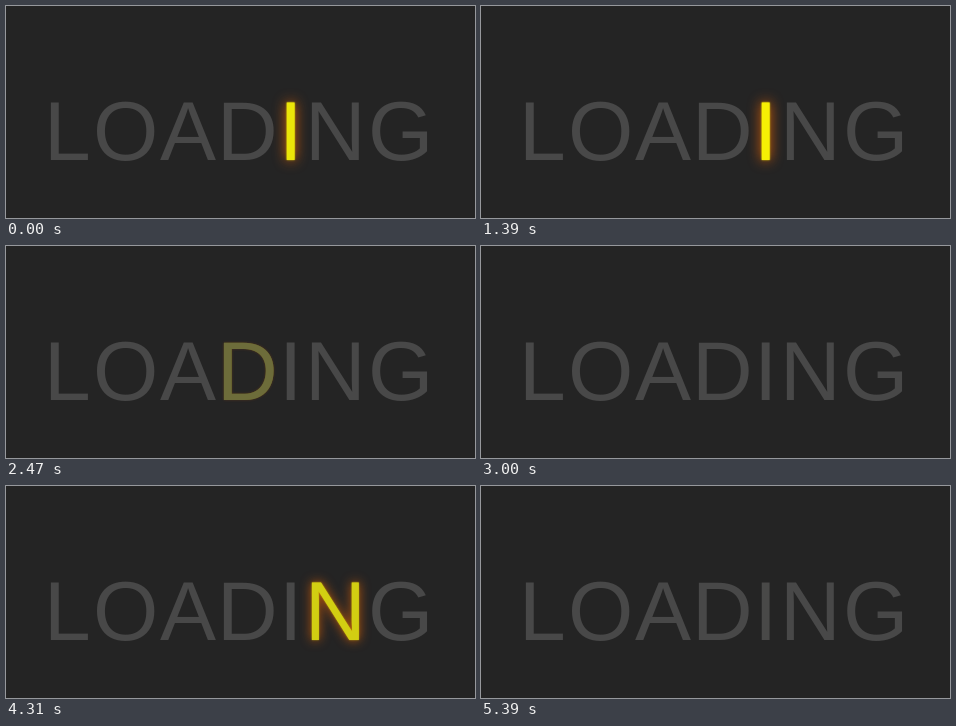
Animation, 469 px wide and 212 px high, one loop 5.46 s. Source, as an HTML page:

```html
<!DOCTYPE html>
<html lang="en">
<head>
<meta charset="utf-8">
<title>Loading</title>
<style>
  html, body { margin: 0; width: 100%; height: 100%; overflow: hidden; background: #242424; }
  .word {
    position: absolute; left: 0; top: 83px;
    font: 84px/84px "Liberation Sans", Arial, sans-serif;
    color: #484848;
  }
  .word span { position: absolute; top: 0; }
</style>
</head>
<body>
<div class="word" id="word"></div>
<script>
  const LOOP = 5460, TICK = LOOP / 71;   // about 13 pictures per second
  const STEP = 196.6;                    // delay from one letter to the next
  const CYCLE = STEP * 7, FADE = CYCLE / 10;
  const FIRST = 4, PEAK = 15;            // letter "I" peaks just after the start
  const DIM = [72, 72, 72], LIT = [255, 249, 0];
  const lefts = [38, 87, 154, 211, 273, 299, 362];

  const word = document.getElementById('word');
  const letters = [...'LOADING'].map((char, i) => {
    const span = document.createElement('span');
    span.textContent = char;
    span.style.left = lefts[i] + 'px';
    word.append(span);
    return span;
  });

  // Brightness climbs over the last tenth of each cycle, then drops at once.
  function glow(t, i) {
    const peak = PEAK + (i - FIRST) * STEP;
    const phase = (((t - peak) % CYCLE) + CYCLE) % CYCLE;
    return Math.max(0, 1 - (CYCLE - phase) / FADE);
  }

  function paint(span, p) {
    const rgb = DIM.map((c, k) => Math.round(c + (LIT[k] - c) * p));
    span.style.color = `rgb(${rgb})`;
    span.style.textShadow = p
      ? `0 0 ${2 * p}px rgba(255,249,0,${p}), 0 0 ${14 * p}px rgba(255,108,0,${p})`
      : 'none';
  }

  let start;
  function draw(now) {
    start ??= now;
    const tick = Math.floor(((now - start) % LOOP + 8) / TICK) % 71;
    letters.forEach((span, i) => paint(span, glow(tick * TICK, i)));
    requestAnimationFrame(draw);
  }
  requestAnimationFrame(draw);
</script>
</body>
</html>
```
